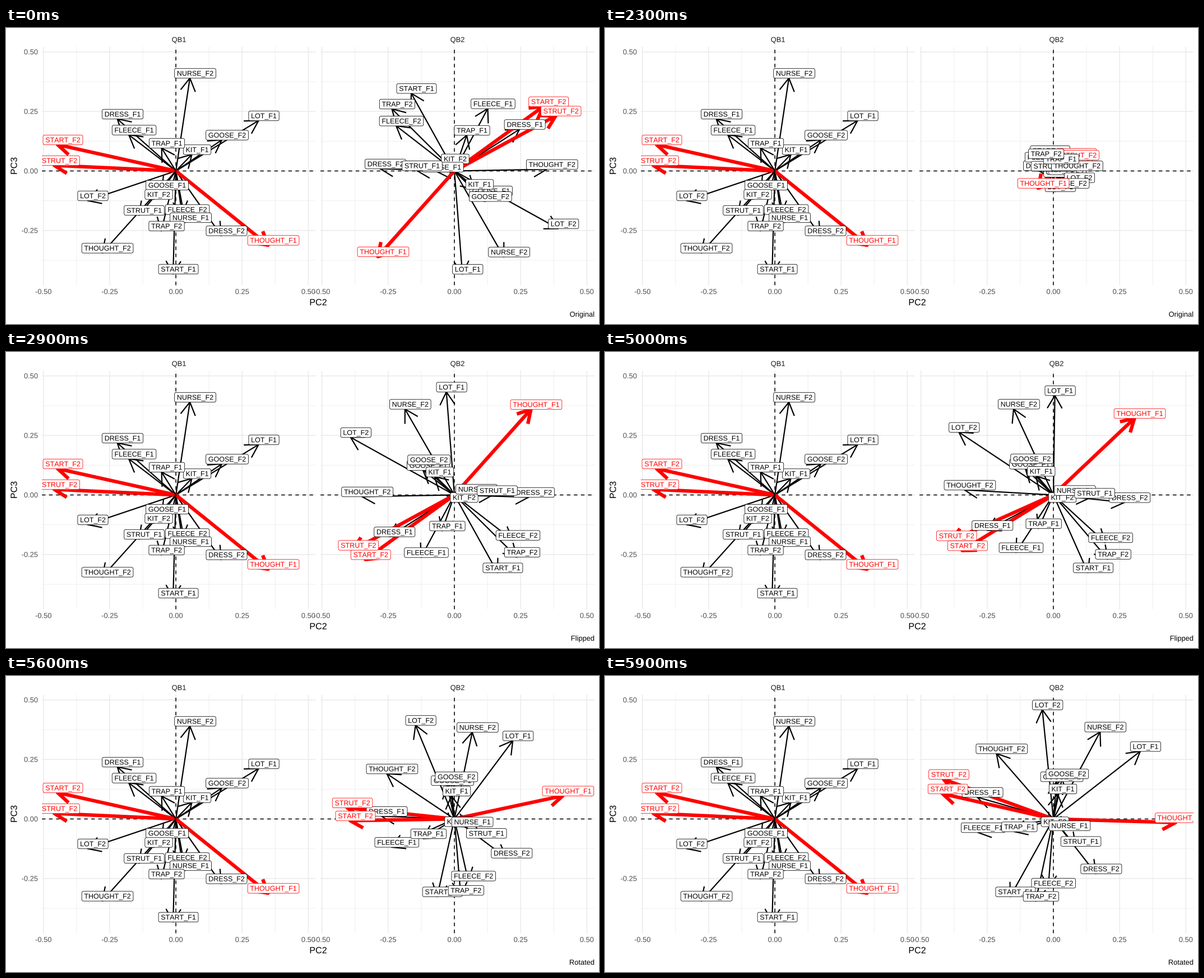
These frames come from a looping animation (1058 px wide and 529 px high, 10 s). A matplotlib script:

```python
import math
from functools import lru_cache

import numpy as np
import matplotlib.pyplot as plt
from matplotlib.animation import FuncAnimation
from matplotlib.patches import FancyBboxPatch, PathPatch, Rectangle
from matplotlib.path import Path
from matplotlib.textpath import TextPath
from matplotlib.transforms import Affine2D

DPI = 105.8
W, H = 1058, 529
PT = 72 / DPI                       # points per pixel
UNIT = np.array([472.6, 425.6])     # pixels per data unit
NUDGE = 0.02 * UNIT
ZERO_Y = H - 255.5
TOP, BOTTOM = H - 33.4, H - 459.7
PANEL_W = 488.8
PANELS = {"QB1": (64.2, 303.1), "QB2": (561.1, 800.0)}   # left edge, zero
BLACK_W, RED_W = 2.2, 6.27
BARB = 0.25 * DPI
LABEL_SIZE, AXIS_SIZE, TITLE_SIZE = 12.5, 12.88, 16.1
CAP = 0.688
STATES = ["Original", "Flipped", "Rotated"]
TURN = math.radians(-53.1)
HIGHLIGHT = {"START_F2", "STRUT_F2", "THOUGHT_F1"}

# Arrow tips in pixels from the panel origin, y up: QB1 x, y, QB2 x, y
TIPS = {
    "DRESS_F1": (-104.5, 93, 116.2, 74.5),
    "DRESS_F2": (81, -115.5, -132.4, 4),
    "FLEECE_F1": (-84, 64.5, 59.5, 111.5),
    "FLEECE_F2": (11, -77.5, -104, 80.7),
    "GOOSE_F1": (-25, -34, 56, -44.2),
    "GOOSE_F2": (82, 55.5, 54.8, -54.3),
    "KIT_F1": (28.5, 29.5, 35.5, -32.5),
    "KIT_F2": (-40, -50.5, -8, 13),
    "LOT_F1": (147.5, 90, 14.3, -184.2),
    "LOT_F2": (-157.5, -53, 185.2, -103),
    "NURSE_F1": (17, -92, -30, -1.7),
    "NURSE_F2": (25, 166, 88.2, -153.5),
    "START_F1": (-5, -184, -77, 138.8),
    "START_F2": (-211, 47, 158.7, 115.3),
    "STRUT_F1": (-66, -79, -67, 0.7),
    "STRUT_F2": (-217, 10, 180.7, 98.5),
    "THOUGHT_F1": (164.5, -132.5, -136.5, -153),
    "THOUGHT_F2": (-131.5, -146.5, 164.8, 3),
    "TRAP_F1": (-25.5, 41, 22, 64),
    "TRAP_F2": (-26, -107, -111.5, 111),
}

plt.rcParams["path.snap"] = False
fig = plt.figure(figsize=(10, 5), dpi=DPI, facecolor="white")
ax = fig.add_axes([0, 0, 1, 1])
ax.set_xlim(0, W)
ax.set_ylim(0, H)
ax.axis("off")


@lru_cache(None)
def glyph(text):
    return TextPath((0, 0), text, size=100, prop={"family": "Liberation Sans"})


@lru_cache(None)
def advance(char):
    bar = glyph("|").vertices[:, 0].min()
    return glyph(char + "|").vertices[:, 0].max() - glyph("|").vertices[:, 0].max() \
        if bar is not None else 0


def text_path(text, size, align=0.5):
    """Unkerned outline, centred on its cap height; also returns its width."""
    scale, x, parts = size / 100, 0.0, []
    for char in text:
        g = glyph(char)
        parts.append(Path(g.vertices * scale + [x, 0], g.codes))
        x += advance(char) * scale
    path = Path.make_compound_path(*parts)
    shift = Affine2D().translate(-align * x, -CAP * size / 2)
    return path.transformed(shift), x


def add_text(x, y, text, size, color="black", align=0.5, angle=0):
    path, _ = text_path(text, size, align)
    place = Affine2D().rotate_deg(angle).translate(x, H - y)
    patch = PathPatch(path.transformed(place), facecolor=color, linewidth=0)
    return ax.add_patch(patch)


def add_line(xs, ys, width, clip, color="#EBEBEB", dash=None):
    line, = ax.plot(xs, ys, color=color, lw=width * PT, zorder=1,
                    solid_capstyle="butt", dash_capstyle="butt")
    if dash:
        line.set_linestyle((0, (dash, dash)))
        line.set_zorder(2)
    line.set_clip_path(clip)


def arrow_path(origin, tip):
    end = origin + tip
    back = math.atan2(-tip[1], -tip[0])
    barbs = [end + BARB * np.array([math.cos(back + a), math.sin(back + a)])
             for a in (math.pi / 6, -math.pi / 6)]
    return Path([origin, end, barbs[0], end, barbs[1]],
                [Path.MOVETO, Path.LINETO, Path.MOVETO, Path.LINETO, Path.LINETO])


class Vowel:
    """An arrow from the panel origin with a boxed name near its tip."""

    def __init__(self, name, zero, clip):
        self.origin = np.array([zero, ZERO_Y])
        color = "red" if name in HIGHLIGHT else "black"
        width = RED_W if name in HIGHLIGHT else BLACK_W
        self.arrow = PathPatch(Path([self.origin, self.origin]), fill=False,
                               edgecolor=color, lw=width * PT, zorder=3,
                               capstyle="butt", joinstyle="round")
        path, w = text_path(name, LABEL_SIZE)
        w, h = w + 8.4, 17.4
        box = FancyBboxPatch((-w / 2, -h / 2), w, h, zorder=4,
                             boxstyle="round,pad=0,rounding_size=3.2",
                             facecolor="white", edgecolor=color, lw=0.8 * PT)
        text = PathPatch(path, facecolor=color, linewidth=0, zorder=4)
        self.shift = Affine2D()
        for patch in (box, text):
            patch.set_transform(self.shift + ax.transData)
        for patch in (self.arrow, box, text):
            ax.add_patch(patch)
            patch.set_clip_path(clip)

    def move(self, tip):
        self.arrow.set_path(arrow_path(self.origin, tip))
        self.shift.clear().translate(*(self.origin + tip + NUDGE))


def rotate(tip):
    x, y = tip / UNIT
    c, s = math.cos(TURN), math.sin(TURN)
    return np.array([x * c - y * s, x * s + y * c]) * UNIT


def make_panel(title, left, zero):
    right = left + PANEL_W
    clip = Rectangle((left, BOTTOM), PANEL_W, TOP - BOTTOM,
                     transform=ax.transData)
    eighths = [-3, -1, 1, 3, -4, -2, 0, 2, 4]
    for k in eighths:
        width = 0.79 if k % 2 else 1.57
        x, y = zero + k / 8 * UNIT[0], ZERO_Y + k / 8 * UNIT[1]
        add_line([x, x], [BOTTOM, TOP], width, clip)
        add_line([left, right], [y, y], width, clip)
        if k % 2 == 0:
            add_text(x, 471, f"{k / 8:.2f}", AXIS_SIZE, "#4D4D4D")
    add_line([left, right], [ZERO_Y, ZERO_Y], 1.57, clip, "black", 4)
    add_line([zero, zero], [BOTTOM, TOP], 1.57, clip, "black", 4)
    add_text(left + PANEL_W / 2, 20.7, title, AXIS_SIZE, "#1A1A1A")
    return [Vowel(name, zero, clip) for name in TIPS]


fixed, moving = [make_panel(t, *edges) for t, edges in PANELS.items()]
for k in (-2, 0, 2, 4):
    add_text(57, H - ZERO_Y - k / 8 * UNIT[1], f"{k / 8:.2f}", AXIS_SIZE,
             "#4D4D4D", align=1)
add_text(557, 490, "PC2", TITLE_SIZE)
add_text(14, 246.5, "PC3", TITLE_SIZE, angle=90)
captions = [add_text(1050, 511.5, s, AXIS_SIZE, align=1) for s in STATES]

tips = np.array(list(TIPS.values()), dtype=float)
for vowel, tip in zip(fixed, tips[:, :2]):
    vowel.move(tip)
start = tips[:, 2:]
poses = [start, -start, np.array([rotate(t) for t in -start])]


def progress(frame, first):
    return min(max((frame - first + 1) / 10, 0), 1)


def update(frame):
    flip, turn = progress(frame, 20), progress(frame, 50)
    if turn > 0:
        a, b, t, state = poses[1], poses[2], turn, 1
    else:
        a, b, t, state = poses[0], poses[1], flip, 0
    state += t > 0.5
    for vowel, tip in zip(moving, a + (b - a) * t):
        vowel.move(tip)
    for i, caption in enumerate(captions):
        caption.set_visible(i == state)
    return []


update(0)
anim = FuncAnimation(fig, update, frames=100, interval=100, repeat=True,
                     repeat_delay=0, blit=False)
plt.show()
```
